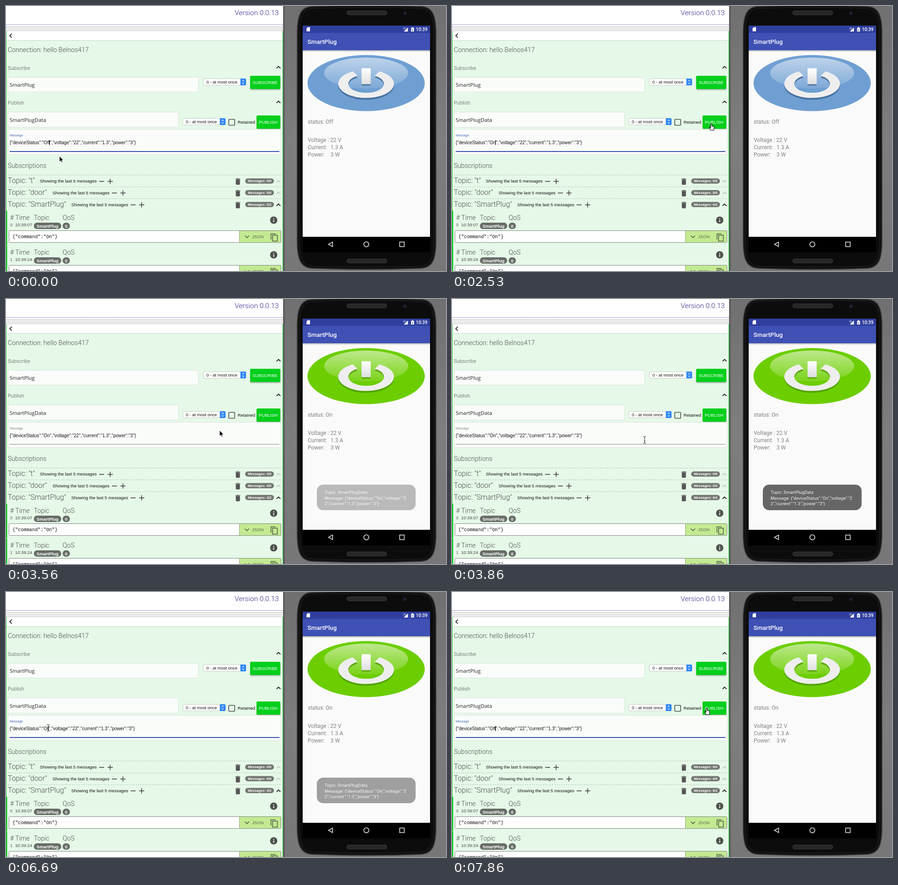
Animation of 964 by 581 pixels, one loop 8000 ms. Source, as an HTML page:

```html
<!DOCTYPE html>
<html lang="en">
<head>
<meta charset="utf-8">
<title>Smart plug demo</title>
<style>
html, body { margin: 0; width: 100%; height: 100%; overflow: hidden; background: #fff; }
svg { display: block; width: 964px; height: 581px; }
text { white-space: pre; font: 9.6px "Liberation Sans", Arial, sans-serif; fill: #111; }
.thin { font-family: Roboto, sans-serif; font-weight: 300; fill: #484f49; }
.field { font: 11.4px "Open Sans", sans-serif; fill: #222; }
.code { font: 10.3px "Liberation Mono", monospace; }
.white { fill: #fff; }
.bold { font-weight: 700; fill: #fff; }
.app { font: 12px Roboto, sans-serif; fill: #808080; }
.toast { font: 9.7px Roboto, sans-serif; fill: #f2f2f2; }
.box { fill: #fafcfa; stroke: #dce6dc; }
.go { fill: #04cf1c; }
.chev { fill: none; stroke: #111; stroke-width: 1.7; }
</style>
</head>
<body>
<svg viewBox="0 0 964 581">
  <defs>
    <linearGradient id="desk" x1="0" x2="0" y1="0" y2="1">
      <stop offset="0" stop-color="#707070"/><stop offset=".5" stop-color="#7e7e7e"/><stop offset="1" stop-color="#777"/>
    </linearGradient>
    <linearGradient id="gloss" x1="0" x2="0" y1="0" y2="1">
      <stop offset="0" stop-color="#fff" stop-opacity=".55"/><stop offset="1" stop-color="#fff" stop-opacity=".1"/>
    </linearGradient>
    <linearGradient id="metal" x1="0" x2="0" y1="0" y2="1">
      <stop offset="0" stop-color="#fff"/><stop offset="1" stop-color="#dedede"/>
    </linearGradient>
    <linearGradient id="drop" x1="0" x2="0" y1="0" y2="1">
      <stop offset="0" stop-color="#000" stop-opacity=".28"/><stop offset="1" stop-color="#000" stop-opacity="0"/>
    </linearGradient>
    <filter id="soft" x="-20%" y="-20%" width="140%" height="150%"><feGaussianBlur stdDeviation="1.3"/></filter>
    <path id="up" class="chev" d="M-4.3 2.2 0-2.1 4.3 2.2"/>
    <g id="select">
      <rect x=".5" y=".5" width="93" height="14" rx="2.5" fill="#fff" stroke="#c6cfc6"/>
      <path d="M81.500 0H91.500A2.500 2.500 0 0 1 94 2.500V12.500A2.500 2.500 0 0 1 91.500 15H81.500Z" fill="#2f86f4"/>
      <path d="M85.500 6l2.300-2.500L90 6M85.500 9l2.300 2.500L90 9" fill="none" stroke="#fff" stroke-width="1.1"/>
      <text x="7" y="11" style="font-size:9.5px">0 - at most once</text>
    </g>
    <path id="trash" d="M-4.500 2.500H4.500V12A2 2 0 0 1 2.500 14H-2.500A2 2 0 0 1-4.500 12ZM-5.500 .8H-2.800L-1.800 0H1.800L2.800 .8H5.500V2H-5.500Z" fill="#555"/>
    <path id="ring" d="M-24-43.900A50 50 0 1 0 24-43.900" fill="none" stroke-width="22" transform="scale(1 .51)"/>
    <g id="message">
      <rect y="0" width="2.500" height="75" fill="#0ac720"/>
      <g class="thin" font-size="14.1">
        <text class="thin" x="9" y="20" style="font-size:14.1px"># Time</text>
        <text class="thin" x="61" y="20" style="font-size:14.1px">Topic</text>
        <text class="thin" x="124" y="20" style="font-size:14.4px">QoS</text>
      </g>
      <rect x="61" y="26" width="60" height="14" rx="7" fill="#686d68"/>
      <rect x="124" y="26" width="16" height="14" rx="7" fill="#686d68"/>
      <text class="bold" x="67" y="36.500">SmartPlug</text>
      <text class="bold" x="129.300" y="36.500">0</text>
      <circle cx="586.500" cy="20.500" r="8" fill="#4d524d"/>
      <path d="M586.500 19.500V25M586.500 16V18" stroke="#fff" stroke-width="1.700"/>
      <rect x="6.500" y="43.500" width="596" height="26" rx="2" fill="#fdfefd"/>
      <path d="M511.500 43.500H602.500V69.500H511.500Z" fill="#c3ea92"/>
      <rect x="6.500" y="43.500" width="596" height="26" rx="2" fill="none" stroke="#7d857d"/>
      <path d="M511.500 44V69" stroke="#8faa72"/>
      <text class="code" x="14" y="60">{"command":"On"}</text>
      <path class="chev" d="M523.500 54.500 528 59 532.500 54.500" style="stroke:#556048"/>
      <text x="539" y="60" style="fill:#5e6b50">JSON</text>
      <path d="M580.500 63V50.500H591M584 53.500H594.500V66.500H584Z" fill="none" stroke="#4f5a45" stroke-width="1.500"/>
    </g>
  </defs>

  <rect width="964" height="581" fill="url(#desk)"/>
  <rect x="607" width="4" height="581" fill="#5f5f5f"/>

  <g id="page">
    <rect width="607" height="581" fill="#fff"/>
    <text class="thin" x="501" y="19.500" style="font-size:15.5px;fill:#33238c">Version 0.0.13</text>
    <path d="M0 40.500H607" stroke="#3f35a0" stroke-dasharray="1 1"/>
    <rect y="44" width="607" height="11" fill="#ebebeb"/>
    <path d="M0 44.500H607M0 54.500H607" stroke="#d2d2d2"/>
    <path class="chev" d="M12.800 60.500 8.300 65 12.800 69.500"/>
    <rect y="75" width="607" height="506" fill="#e6f8e8"/>
    <path d="M0 75.500H607" stroke="#c9d9cb"/>
    <path d="M.5 55V581M606.500 55V581" stroke="#17cf2c"/>

    <text class="thin" x="4" y="101" style="font-size:14.3px">Connection: hello Belnos417</text>
    <text class="thin" x="4" y="139.500" style="font-size:11.2px">Subscribe</text>
    <text class="thin" x="4" y="215.500" style="font-size:11.1px">Publish</text>
    <use href="#up" x="597" y="134.500"/>
    <use href="#up" x="597" y="210.500"/>

    <rect class="box" x="4.500" y="156.500" width="417" height="32"/>
    <text class="field" x="8" y="177">SmartPlug</text>
    <use href="#select" x="432" y="159"/>
    <rect x="535" y="155" width="66" height="29" rx="2" fill="#000" opacity=".3" filter="url(#soft)"/>
    <rect class="go" x="535" y="153" width="66" height="29" rx="2"/>
    <text class="white" x="540.500" y="171" style="font-size:9.4px">SUBSCRIBE</text>

    <rect class="box" x="4.500" y="232.500" width="373" height="33"/>
    <text class="field" x="8" y="254">SmartPlugData</text>
    <use href="#select" x="387" y="246"/>
    <rect x="488" y="248.500" width="13" height="13" rx="1" fill="none" stroke="#4a4f4a" stroke-width="1.600"/>
    <text x="507.500" y="258">Retained</text>
    <rect x="549" y="242" width="52" height="29" rx="2" fill="#000" opacity=".3" filter="url(#soft)"/>
    <rect class="go" x="549" y="240" width="52" height="29" rx="2"/>
    <rect id="press" x="549" y="240" width="52" height="29" rx="2" fill="#fff"/>
    <text class="white" x="554" y="258" style="font-size:9.5px">PUBLISH</text>

    <rect class="box" x="4.500" y="270.500" width="598" height="55"/>
    <text id="label" x="8" y="286" style="font-size:7.2px">Message</text>
    <text id="json" x="8" y="302.500" style="font-size:10.08px"></text>
    <path id="caret" d="M.5 294V305" stroke="#000"/>
    <path d="M8 318.500H599" stroke="#858585"/>
    <path id="underline" d="M-295.500 0H295.500" stroke="#3450ab" stroke-width="2"/>

    <text class="thin" x="4" y="354.500" style="font-size:14.1px">Subscriptions</text>
    <g id="topics"></g>
    <use href="#message" y="449"/>
    <text x="9" y="482.500" style="font-size:9px;fill:#555">0</text>
    <text x="20" y="482.500" style="fill:#444">10:39:07</text>
    <use href="#message" y="525"/>
    <text x="9" y="558.500" style="font-size:9px;fill:#555">1</text>
    <text x="20" y="558.500" style="fill:#444">10:39:24</text>
  </g>

  <g id="phone">
    <path d="M942 192H944.500V221H942ZM942 240H944.500V310H942Z" fill="#909090" stroke="#555" stroke-width=".5"/>
    <path d="M638 60C638 20 646 2 670 1Q790-4 910 1C934 2 942 20 942 60V515C942 557 934 573 910 575Q790 580 670 575C646 573 638 557 638 515Z" fill="#111" stroke="#3b3b3b" stroke-width="2"/>
    <path d="M643 60C643 24 650 7 672 5.500Q790 1 908 5.500C930 7 937 24 937 60V515C937 552 930 568 908 570Q790 574 672 570C650 568 643 552 643 515Z" fill="#0c0c0c" stroke="#222"/>
    <rect x="746.500" y="10.500" width="88" height="9" rx="4.500" fill="#272727" stroke="#3a3a3a"/>
    <rect x="746.500" y="554.500" width="88" height="9" rx="4.500" fill="#272727" stroke="#3a3a3a"/>
    <circle cx="874" cy="16" r="5" fill="#15151d"/><circle cx="874" cy="16" r="2" fill="#29294a"/>
    <rect x="650" y="43" width="279" height="497" fill="#000"/>
    <rect x="650" y="43" width="279" height="463" fill="#fafafa"/>
    <rect x="650" y="97" width="279" height="4" fill="url(#drop)"/>
    <rect x="650" y="43" width="279" height="17" fill="#303f9f"/>
    <rect x="650" y="59" width="279" height="38" fill="#3f51b5"/>
    <path d="M661 46.500H666V55.500H658.500V49Z" fill="#fff"/>
    <path d="M880.500 47V56H871.500Z" fill="#fff"/>
    <text x="870" y="50.500" style="font-size:5px;fill:#fff">3G</text>
    <path d="M887.500 48H889.500V46.500H892V48H894V56H887.500Z" fill="#fff"/>
    <path d="M891.500 49.500 889.500 52.500H892L890.500 55" fill="none" stroke="#303f9f" stroke-width=".8"/>
    <text class="app" x="898" y="55" style="font-size:10px;font-weight:500;fill:#fff">10:39</text>
    <text class="app" x="660.500" y="83" style="font-size:13.5px;font-weight:500;fill:#fff">SmartPlug</text>

    <ellipse id="disc" cx="789" cy="169" rx="128.500" ry="61.500"/>
    <ellipse cx="789" cy="147" rx="92" ry="34" fill="url(#gloss)"/>
    <g id="shade" transform="translate(789 174.500)" opacity=".75">
      <use href="#ring"/><path d="M-10-35H10V0H-10Z" stroke="none"/>
    </g>
    <use href="#ring" x="0" y="0" transform="translate(789 170.500)" stroke="#eee"/>
    <rect x="779" y="136.500" width="20" height="35" fill="url(#metal)"/>

    <text id="status" class="app" x="661" y="258"></text>
    <text class="app" x="661" y="298">Voltage : 22 V</text>
    <text class="app" x="661" y="314">Current:</text><text class="app" x="711" y="314">1.3 A</text>
    <text class="app" x="661" y="330">Power:</text><text class="app" x="711" y="330">3 W</text>
    <g id="toast">
      <rect x="681" y="407" width="216.500" height="56" rx="14" fill="#666"/>
      <text class="toast" x="698" y="427">Topic: SmartPlugData</text>
      <text class="toast" x="698" y="439.500">Message: {"deviceStatus":"On","voltage":"2</text>
      <text class="toast" x="698" y="452">2","current":"1.3","power":"3"}</text>
    </g>
    <g fill="none" stroke="#e2e2e2" stroke-width="1.600">
      <path d="M715.500 517.500V527.500L706.500 522.500Z"/>
      <circle cx="789.500" cy="522.500" r="5.500"/>
      <rect x="862.500" y="517.500" width="10" height="10"/>
    </g>
  </g>

  <path id="arrow" d="M0 0V12.500L2.900 9.900 4.900 14.300 6.900 13.400 5 9.200H8.700Z" stroke="#fff" stroke-width=".9"/>
  <path id="hand" d="M-1.300-4.500Q-1.300-6 0-6T1.300-4.500V-1Q3-2 3.400-.4 5-1.200 5.300 .4 6.800 .2 6.500 2.500L5.500 8.500H-1L-4.300 3Q-5 1.300-3.500 1.200L-1.300 3Z" fill="#fff" stroke="#000" stroke-width="1.100"/>
  <path id="beam" d="M-3-7.500Q0-7.500 0-5.500 0-7.500 3-7.500M0-5.500V5.500M-3 7.500Q0 7.500 0 5.500 0 7.500 3 7.500M-1.500 2.500H1.500" fill="none" stroke="#222"/>
</svg>

<script>
const LOOP = 8000;
const $ = id => document.getElementById(id);

// name, baseline, start of the side note, messages, chevron opacity
const topics = [["t", 388, 74, "0/0", .2], ["door", 413.5, 102, "0/0", .2], ["SmartPlug", 439.5, 143, "0/2", 1]];
$("topics").innerHTML = topics.map(([name, y, x, count, dim]) => `
  <path d="M4 ${Math.round(y) - 17.5}H605" stroke="#b4c6b6" stroke-dasharray="3 2"/>
  <text class="thin" x="4" y="${y}" style="font-size:15.8px">Topic: "${name}"</text>
  <text x="${x}" y="${y - 1}">Showing the last 5 messages</text>
  <path d="M${x + 130} ${y - 3.5}h11M${x + 148.5} ${y - 3.5}h11.5m-5.75-5.75v11.5" stroke="#333" stroke-width="1.4"/>
  <use href="#trash" x="508" y="${y - 10}"/>
  <rect x="524" y="${y - 10}" width="63" height="11.5" rx="5.75" fill="#717671"/>
  <text class="bold" x="530" y="${y - 1.7}" style="font-size:7.6px">Messages: ${count}</text>
  <use href="#up" x="597" y="${y - 3.5}" opacity="${dim}"/>`).join("");

const caretX = { Off: 95, On: 95, Of: 92.3, O: 89.5 };

// Each step changes only the listed properties; line is the focus underline's spread.
const steps = [
  [0, { word: "Off", caret: 1, line: 1, press: 0, on: 0, toast: 0, pointer: ["arrow", 117, 329] }],
  [290, { caret: 0 }],
  [440, { word: "Of", caret: 1 }],
  [740, { word: "O" }],
  [1190, { caret: 0 }],
  [1490, { word: "On", caret: 1 }],
  [1930, { caret: 0, pointer: ["arrow", 142, 327] }],
  [2080, { pointer: ["arrow", 228, 315] }],
  [2230, { pointer: ["beam", 362, 300] }],
  [2380, { caret: 1, pointer: ["arrow", 486, 279] }],
  [2530, { pointer: ["hand", 568, 264] }],
  [2670, { pointer: ["arrow", 603, 255] }],
  [2820, { caret: 0, line: 0, press: .15, pointer: ["hand", 574, 261] }],
  [2970, { press: .25, pointer: ["hand", 571, 262] }],
  [3120, { press: 0 }],
  [3410, { on: 1, toast: .1, pointer: ["arrow", 540, 271] }],
  [3560, { toast: .43, pointer: ["arrow", 468, 288] }],
  [3710, { toast: .75, pointer: ["beam", 434, 303] }],
  [3860, { toast: 1, pointer: ["beam", 422, 309] }],
  [4010, { pointer: ["beam", 420, 311] }],
  [4610, { pointer: ["beam", 380, 306] }],
  [4760, { pointer: ["beam", 246, 292] }],
  [4910, { pointer: ["beam", 124, 290] }],
  [5060, { pointer: ["beam", 85, 296] }],
  [5210, { pointer: ["beam", 92.5, 298] }],
  [5660, { caret: 1, line: .7 }],
  [5810, { line: 1 }],
  [6110, { caret: 0 }],
  [6250, { word: "O", caret: 1 }],
  [6540, { toast: .85 }],
  [6690, { word: "Of", toast: .61 }],
  [6840, { word: "Off", toast: .28 }],
  [6980, { toast: 0, pointer: ["beam", 112, 293] }],
  [7130, { pointer: ["beam", 238, 256] }],
  [7270, { pointer: ["arrow", 400, 218] }],
  [7420, { caret: 0, pointer: ["arrow", 516, 229] }],
  [7570, { pointer: ["hand", 559, 259] }],
  [7710, { pointer: ["hand", 560, 260] }],
  [7860, { caret: 1, pointer: ["hand", 558, 260.5] }],
];

function stateAt(time) {
  return Object.assign({}, ...steps.filter(([start]) => start <= time).map(([, change]) => change));
}

function draw(time) {
  const s = stateAt(time);
  $("json").textContent = `{"deviceStatus":"${s.word}","voltage":"22","current":"1.3","power":"3"}`;
  $("caret").setAttribute("transform", `translate(${caretX[s.word]} 0)`);
  $("caret").style.opacity = s.caret;
  $("label").style.fill = s.line ? "#4a68b8" : "#858585";
  $("underline").setAttribute("transform", `translate(303.5 319) scale(${s.line} 1)`);
  $("underline").style.opacity = s.line ? 1 : 0;
  $("press").style.opacity = s.press;
  $("disc").style.fill = s.on ? "#6cce00" : "#6f9fd2";
  $("shade").style.fill = $("shade").style.stroke = s.on ? "#4d9700" : "#3a628f";
  $("status").textContent = "status: " + (s.on ? "On" : "Off");
  $("toast").style.opacity = s.toast;

  const [kind, x, y] = s.pointer;
  for (const name of ["arrow", "hand", "beam"]) $(name).style.display = name === kind ? "" : "none";
  $(kind).setAttribute("transform", `translate(${x} ${y})`);
}

const start = performance.now();
function tick() {
  draw((performance.now() - start) % LOOP);
  requestAnimationFrame(tick);
}
tick();
</script>
</body>
</html>
```
